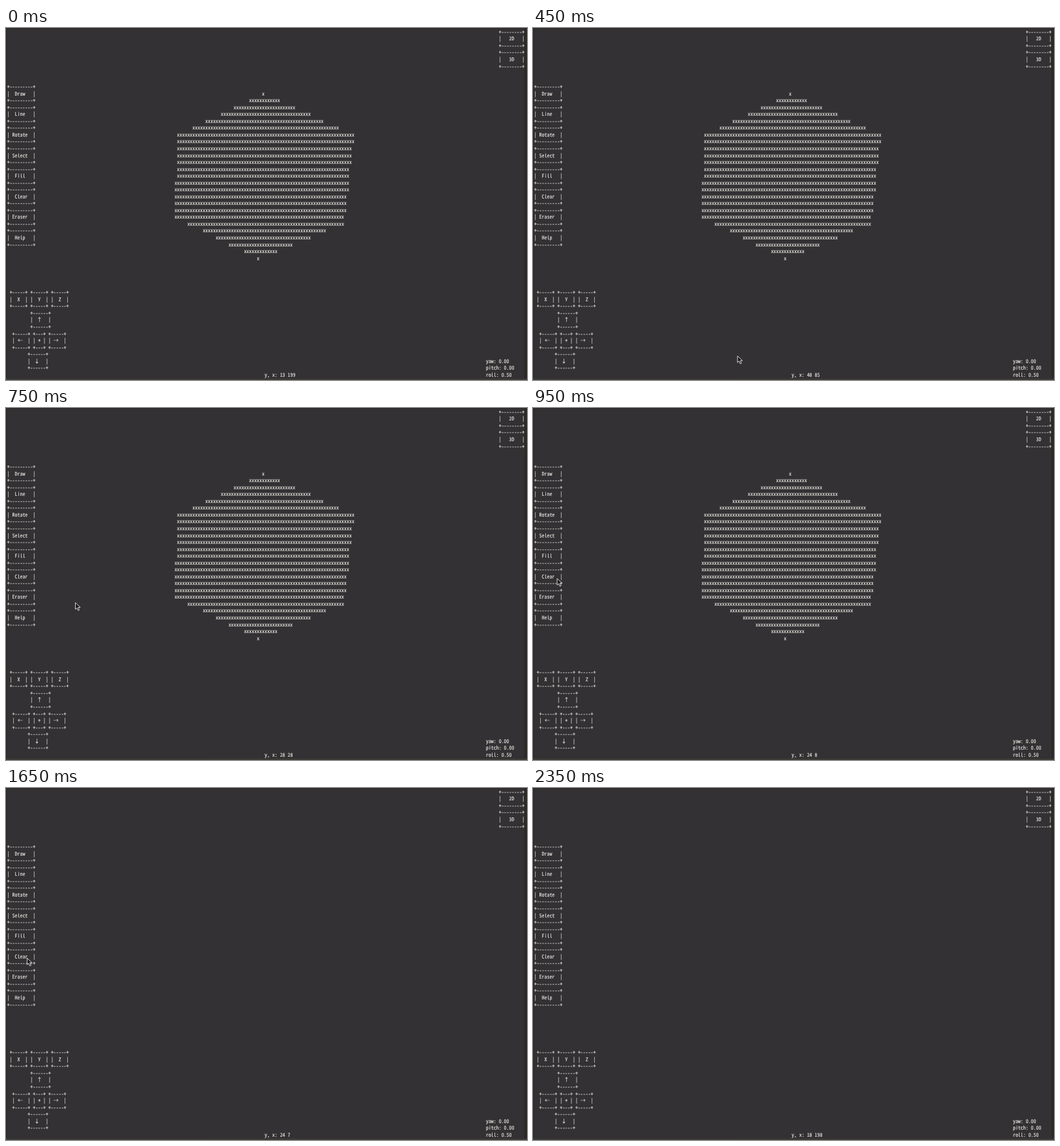
These frames come from a looping animation (800x541 px, 3.4 s). An HTML page:

```html
<!DOCTYPE html>
<html lang="en">
<head>
<meta charset="utf-8">
<title>Terminal paint</title>
<style>
  html, body { margin: 0; width: 100%; height: 100%; overflow: hidden; background: #333133; }
  svg { display: block; width: 100%; height: 100%; }
  text {
    font: 7.906px "Noto Sans Mono CJK JP", "Noto Sans Mono CJK SC", "Noto Sans Mono", monospace;
    fill: #e6e6df; stroke: #e6e6df; stroke-width: .16; white-space: pre;
    text-rendering: geometricPrecision; font-variant-ligatures: none; font-kerning: none;
  }
  .mid { text-anchor: middle; }
</style>
</head>
<body>
<svg viewBox="0 0 800 541" preserveAspectRatio="none">
  <rect width="800" height="541" fill="#2b2a27"/>
  <rect x="1.5" y="1" width="794.5" height="537.5" fill="#333133"/>
  <rect y="538.5" width="800" height="2.5" fill="#3d3b36"/>
  <g id="ui"></g>
  <g id="solid"></g>
  <path id="cursor" d="M.4 .4V10.6L2.8 8.4L4.6 12.5L6.4 11.7L4.7 7.7H8Z" fill="#1c1b1c" stroke="#e8e8e8" stroke-width=".9" stroke-linejoin="round"/>
</svg>
<script>
const LOOP = 3400, STEP = 50, CELL = 3.953, LINE = 10.54;
const $ = id => document.getElementById(id);
const ui = $("ui"), solid = $("solid"), cursor = $("cursor");
const mix = (a, b, p) => a + (b - a) * p;

function put(parent, row, col, str, cls) {
  const el = document.createElementNS("http://www.w3.org/2000/svg", "text");
  el.setAttribute("x", 1.7 + col * CELL);
  el.setAttribute("y", 8.8 + row * LINE);
  if (cls) el.setAttribute("class", cls);
  el.textContent = str;
  parent.append(el);
  return el;
}

// Box of text cells; the label starts pad cells after the left wall.
function box(row, col, width, label, pad) {
  const edge = "+" + "-".repeat(width - 2) + "+";
  put(ui, row, col, edge);
  put(ui, row + 1, col, "|");
  put(ui, row + 1, col + pad, label);
  put(ui, row + 1, col + width - 1, "|");
  put(ui, row + 2, col, edge);
}

function arrow(row, col, width, glyph, mid) {
  box(row, col, width, "", 1);
  put(ui, row + 1, mid, glyph, "mid");
}

["Draw", "Line", "Rotate", "Select", "Fill", "Clear", "Eraser", "Help"]
  .forEach((s, i) => box(8 + 3 * i, 0, 11, s, s.length > 5 ? 2 : 3));
["2D", "3D"].forEach((s, i) => box(3 * i, 191, 10, s, 4));
["X", "Y", "Z"].forEach((s, i) => box(38, 1 + 8 * i, 7, s, 3));
arrow(41, 9, 8, "↑", 12.6);
arrow(44, 2, 7, "←", 5.1);
box(44, 10, 5, "+", 2);
arrow(44, 16, 7, "→", 19);
arrow(47, 8, 8, "↓", 11.6);
["yaw: 0.00", "pitch: 0.00", "roll: 0.50"].forEach((s, i) => put(ui, 48 + i, 186, s));
const status = put(ui, 50, 100, "");

// Column where a side, given as [row, column] corners, crosses a row.
function cross(side, row) {
  const i = Math.max(1, side.findIndex(c => c[0] >= row));
  const [r0, c0] = side[i - 1], [r1, c1] = side[i];
  return Math.round(mix(c0, c1, (row - r0) / (r1 - r0)));
}

// The turned cube is a filled hexagon.
const left = [[9, 99], [15, 66], [27, 65], [33, 97]];
const right = [[9, 99.1], [15, 133.95], [28, 130.05], [33, 97]];
for (let row = 9; row <= 33; row++) {
  const a = cross(left, row);
  put(solid, row, a, "x".repeat(cross(right, row) - a + 1));
}

const easeOut = k => p => 1 - (1 - p) ** k;
const easeIn = k => p => p ** k;

// Pointer moves: position and reported cell as [from, to, easing].
const moves = [
  { start: 0, end: 550,
    x: [800, 297, easeOut(2)], y: [140, 516, easeOut(2)],
    row: [13, 49, easeOut(2)], col: [199, 81, easeOut(2)] },
  { start: 600, end: 1150,
    x: [297, 32, easeOut(4)], y: [516, 261, easeOut(6)],
    row: [49, 24, easeOut(6)], col: [81, 7, easeOut(4)] },
  { start: 2050, end: 2350,
    x: [32, 782, easeIn(1.05)], y: [261, 222, easeOut(10)],
    row: [24, 18, easeIn(1)], col: [7, 198, easeIn(1.7)] }
];

function render(ms) {
  const t = Math.floor(ms % LOOP / STEP) * STEP;
  const move = moves.findLast(m => t >= m.start);
  const p = Math.min(1, (t - move.start) / (move.end - move.start));
  const at = key => {
    const [from, to, ease] = move[key];
    return mix(from, to, ease(p));
  };
  cursor.setAttribute("transform", `translate(${at("x")} ${at("y")})`);
  cursor.style.display = t < 50 || t >= 2350 ? "none" : "";
  solid.style.display = t < 1650 ? "" : "none";
  status.textContent = `y, x: ${Math.round(at("row"))} ${Math.round(at("col"))}`;
}

const start = performance.now();
function tick() {
  render(performance.now() - start);
  requestAnimationFrame(tick);
}
tick();
</script>
</body>
</html>
```
